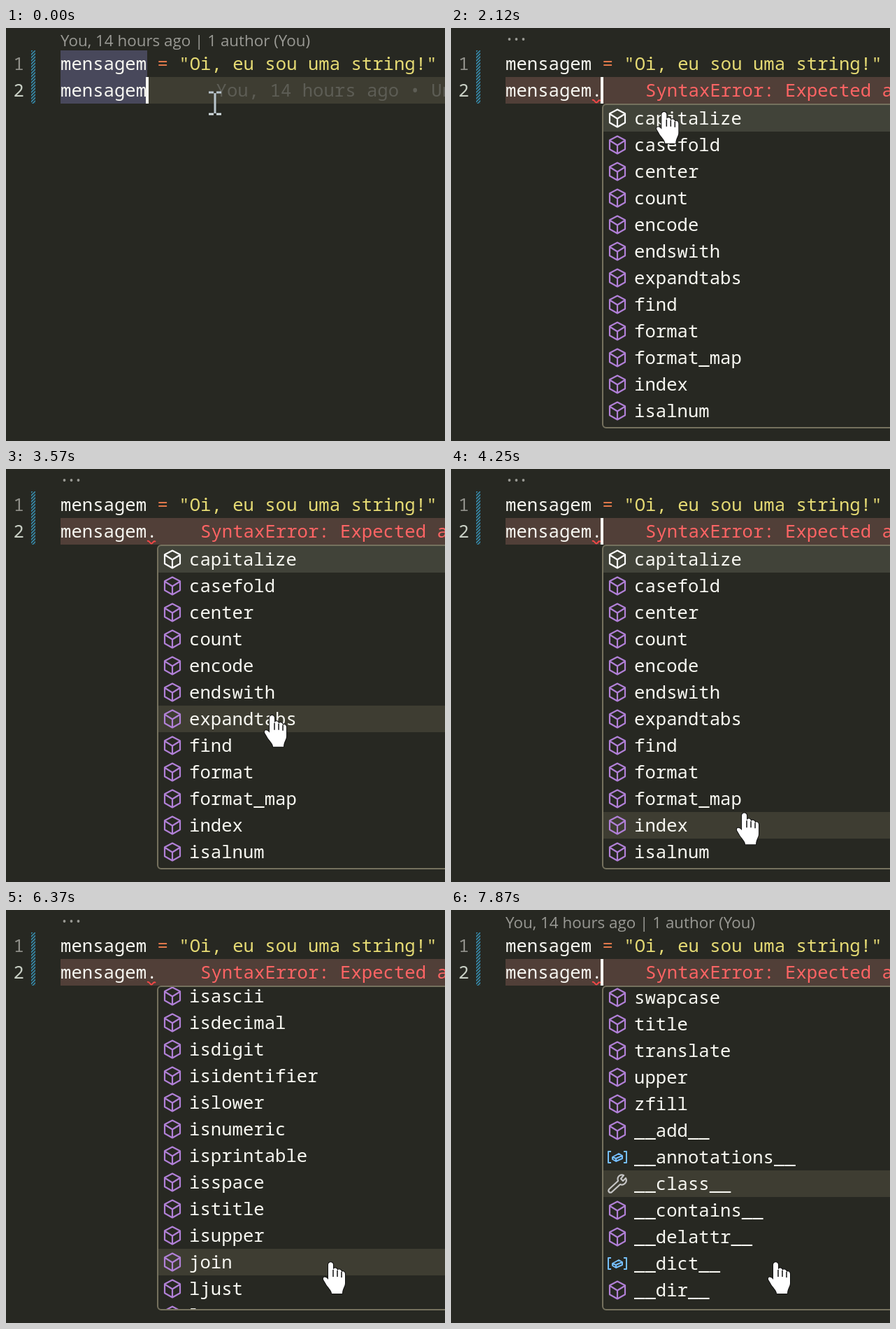
Recreate the animation shown at these times as an HTML page with a canvas. Size 628 by 590 pixels, loop 8 s.

```html
<!DOCTYPE html>
<html lang="pt">
<head>
<meta charset="utf-8">
<style>
html, body { margin: 0; width: 100%; height: 100%; overflow: hidden; background: #272822; }
canvas { display: block; }
</style>
</head>
<body>
<canvas id="stage" width="628" height="590"></canvas>
<script>
const ctx = document.getElementById("stage").getContext("2d");
const LOOP = 8000, ROW = 38, LEFT = 78, COL = 15.39, LIST_TOP = 110, LIST_END = 570;
const MONO = '25.65px "Noto Sans Mono", monospace';
const SANS = '22.4px "Open Sans", sans-serif';

const items = `capitalize casefold center count encode endswith expandtabs find format format_map
index isalnum isalpha isascii isdecimal isdigit isidentifier islower isnumeric isprintable isspace
istitle isupper join ljust lower lstrip maketrans partition removeprefix removesuffix replace rfind
rindex rjust rpartition rsplit rstrip split splitlines startswith strip swapcase title translate
upper zfill __add__ __annotations__ __class__ __contains__ __delattr__ __dict__ __dir__ __doc__`.split(/\s+/);
const fields = ["__annotations__", "__dict__", "__doc__"];

// Caret visibility flips at each of these times.
const blinks = [140, 620, 1610, 1690, 2270, 2770, 3270, 3770, 4290, 4870, 5380, 5870, 6370, 6860, 7350, 7840];
// Each wheel notch moves the list by 100 px; the hover follows later.
const notches = [5380, 5470, 5870, 6100, 6170, 6520, 6570, 6620, 6860, 6900, 6940, 7200, 7280, 7500, 7540, 7870];
const hoverUpdates = [5560, 5940, 6370, 6620, 6940, 7350, 7580, 7840];
// Pointer path: time, x, y.
const path = [[2020, 299, 107], [2770, 346, 201], [2870, 346, 201], [3670, 386, 373], [3690, 387, 375],
  [4250, 420, 491], [4490, 434, 523], [4760, 452, 541], [5280, 465, 503]];

const passed = (times, t) => times.filter(at => at <= t).length;
const scrollAt = t => 100 * passed(notches, t);

function pointerAt(t) {
  const next = path.findIndex(p => p[0] > t);
  if (next === 0) return path[0].slice(1);
  if (next < 0) return path[path.length - 1].slice(1);
  const [a, b] = [path[next - 1], path[next]];
  const k = (t - a[0]) / (b[0] - a[0]);
  return [a[1] + (b[1] - a[1]) * k, a[2] + (b[2] - a[2]) * k];
}

function rect(x, y, w, h, color) {
  ctx.fillStyle = color;
  ctx.fillRect(x, y, w, h);
}

function text(value, x, y, color, font = MONO) {
  ctx.font = font;
  ctx.fillStyle = color;
  ctx.fillText(value, x, y);
}

function stroke(d, color, width) {
  ctx.strokeStyle = color;
  ctx.lineWidth = width;
  ctx.stroke(new Path2D(d));
}

function at(x, y, draw) {
  ctx.save();
  ctx.translate(x, y);
  draw();
  ctx.restore();
}

function gutter() {
  text("1", 10.5, 60, "#90908a");
  text("2", 10.5, 98, "#c8cfc4");
  ctx.save();
  ctx.beginPath();
  ctx.rect(36, 32, 6, 76);
  ctx.clip();
  let d = "";
  for (let y = 30; y < 120; y += 4.5) d += `M35 ${y}L43 ${y - 8}`;
  stroke(d, "#3687a6", 1.6);
  ctx.restore();
}

function header(t) {
  if (t >= 1690 && t < 7580) {
    ctx.fillStyle = "#999994";
    for (const x of [83.5, 93.5, 103.5]) {
      ctx.beginPath();
      ctx.arc(x, 16, 1.9, 0, 7);
      ctx.fill();
    }
  } else {
    text("You, 14 hours ago | 1 author (You)", LEFT, 26, "#999994", SANS);
  }
}

function editor(t) {
  const typed = t >= 1120, failed = t >= 1200;
  rect(LEFT, 70, 550, ROW, failed ? "#513f38" : "#3e3d32");
  if (!typed) rect(LEFT, 32, 124, 2 * ROW, "#48485b");
  text("mensagem", LEFT, 60, "#f8f8f2");
  text("=", LEFT + 9 * COL, 60, "#e0784b");
  text('"Oi, eu sou uma string!"', LEFT + 11 * COL, 60, "#e6db74");
  text(typed ? "mensagem." : "mensagem", LEFT, 98, "#f8f8f2");
  if (failed) text("SyntaxError: Expected attribute name", LEFT + 13 * COL, 98, "#ff6464");
  else text("You, 14 hours ago • Uncommitted changes", typed ? 316 : 300.6, 98, "#5d5d55");
  if (t >= 1360) stroke("M202 103Q204 102 206 105T210 105T214 104", "#f44747", 2);
}

function cube(color) {
  stroke("M0-12.5L11-6.7V6.3L0 12.5L-11 6.3V-6.7ZM-10.5-6L0 .5L10.5-6M0 .5V12", color, 2.2);
}

function field() {
  stroke("M-9-8H-13V8H-9M9-8H13V8H9M-7 0L2-5L7-2V2L-2 6L-7 3ZM-7 0L-2 2L7-2M-2 2V6", "#75beff", 2);
}

function wrench() {
  stroke("M-12 8L1-4C-1-10 4-14 9-12L5-7L8-4L12-8C15-2 9 3 4 1L-8 12C-11 14-14 11-12 8Z", "#c5c5c5", 2.2);
}

function popup(t, pointer) {
  const scroll = scrollAt(t);
  const lastUpdate = hoverUpdates.filter(u => u <= t).pop() || 0;
  const hover = t < 2020 || pointer[1] < LIST_TOP ? -1
    : Math.floor((pointer[1] + 1 - LIST_TOP + scrollAt(lastUpdate)) / ROW);

  ctx.beginPath();
  ctx.roundRect(217, 109, 440, 462, 5);
  ctx.fillStyle = "#272822";
  ctx.fill();
  ctx.save();
  ctx.beginPath();
  ctx.rect(218, LIST_TOP, 410, LIST_END - LIST_TOP);
  ctx.clip();
  items.forEach((name, i) => {
    const y = LIST_TOP + i * ROW - scroll;
    if (y < LIST_TOP - ROW || y > LIST_END) return;
    if (i === 0) rect(218, y, 410, ROW, "#414339");
    else if (i === hover) rect(218, y, 410, ROW, "#3e3d32");
    at(238, y + 19, () => {
      if (fields.includes(name)) field();
      else if (name === "__class__") wrench();
      else cube(i ? "#b180d7" : "#ffffff");
    });
    text(name, 262, y + 28, "#f8f8f2");
  });
  ctx.restore();
  ctx.beginPath();
  ctx.roundRect(217, 109, 440, 462, 5);
  ctx.strokeStyle = "#75715e";
  ctx.lineWidth = 2;
  ctx.stroke();
}

function hand() {
  const shape = new Path2D("M-4 4C-4-1 3-1 3 4V11C4 7 9 8 9 12C11 9 15 11 15 14C17 12 20 14 20 17V30" +
    "C20 35 16 38 16 45H1C1 40-5 36-8 30L-11 25C-12 21-8 20-4 25Z");
  ctx.strokeStyle = "#111111";
  ctx.lineWidth = 2;
  ctx.stroke(shape);
  ctx.fillStyle = "#ffffff";
  ctx.fill(shape);
  stroke("M3 11V21M9 12V21M15 14V22", "#111111", 1.5);
}

function beam() {
  stroke("M-9-15H-2M2-15H9M0-14V15", "#b9c6ce", 3);
  stroke("M-9 16H-2M2 16H9", "#d3dde1", 3);
}

function draw() {
  const t = performance.now() % LOOP;
  const pointer = pointerAt(t);
  ctx.lineJoin = "round";
  rect(0, 0, 628, 590, "#272822");
  header(t);
  editor(t);
  gutter();
  if (t >= 1150) popup(t, pointer);
  if (passed(blinks, t) % 2 === 0) rect(t < 1120 ? 200 : 214, 70, 4, ROW, "#f8f8f0");
  at(...pointer, pointer[1] < LIST_TOP ? beam : hand);
  requestAnimationFrame(draw);
}
draw();
</script>
</body>
</html>
```
